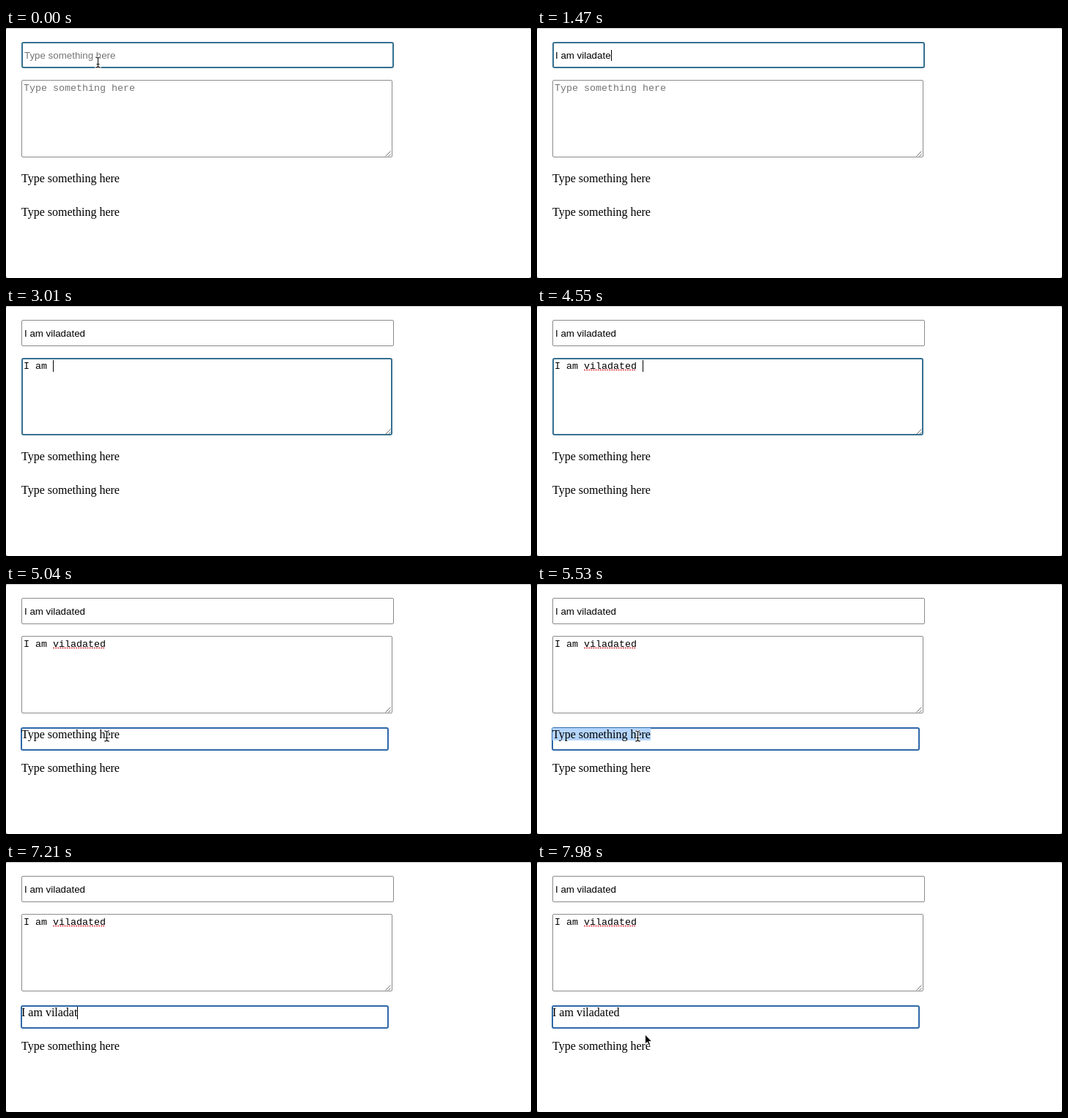
Animation of 716 by 342 pixels, one loop 8 s. Source, as an HTML page:

```html
<!DOCTYPE html>
<html lang="en">
<head>
<meta charset="utf-8">
<title>Typing into editable fields</title>
<style>
  html, body { margin: 0; width: 100%; height: 100%; overflow: hidden; background: #777; }
  #stage { position: relative; width: 716px; height: 342px; overflow: hidden; background: #fff; border-radius: 3px; }
  #stage::before { content: ""; position: absolute; inset: 0 0 auto; height: 1px; background: #ccc; }
  .field, .line, .caret, svg { position: absolute; }
  .field { box-sizing: border-box; --ring: #35708f; }
  .box { border: 1px solid #8a8a8a; border-radius: 2px; }
  .field.focus { border: 2px solid var(--ring); border-radius: 3px; }
  .line { white-space: pre; color: #000; }
  .line.hint { color: #757575; }
  .line.selected span { background: #b4d5fe; }
  .caret { width: 1px; background: #000; visibility: hidden; }
  .sans { font: 13.333px/15px "Liberation Sans", Arial, sans-serif; }
  .mono { font: 13.333px/15px "Liberation Mono", "Courier New", monospace; }
  .serif { font: 16px/18px "Liberation Serif", "Times New Roman", serif; }
  #input { left: 21px; top: 19px; width: 508px; height: 36px; }
  #area { left: 21px; top: 71px; width: 506px; height: 106px; }
  #edit { left: 20px; top: 196px; width: 502px; height: 32px; --ring: #2f68a8; }
  #spell { left: 64px; top: 86px; }
  #grip { left: 516px; top: 167px; }
  #mouse { left: 0; top: 0; overflow: visible; }
</style>
</head>
<body>
<div id="stage">
  <div class="field box" id="input"></div>
  <div class="field box" id="area"></div>
  <div class="field" id="edit"></div>

  <div class="line sans" style="left:25px;top:30px"><span></span></div>
  <div class="line mono" style="left:24px;top:75px"><span></span></div>
  <div class="line serif" style="left:21px;top:197px"><span></span></div>
  <div class="line serif" style="left:21px;top:243px"><span>Type something here</span></div>
  <div class="caret" id="caret"></div>

  <svg id="spell" width="72" height="3">
    <path d="M1 1.5H72" stroke="#e0434b" stroke-width="2" stroke-linecap="round" stroke-dasharray="0.1 3"/>
  </svg>
  <svg id="grip" width="10" height="10">
    <path d="M1.5 8.5L8.5 1.5M5.5 8.5L8.5 5.5" stroke="#707070" fill="none"/>
  </svg>
  <svg id="mouse" width="1" height="1">
    <g id="beam" fill="none" stroke-linecap="round">
      <path id="bar" d="M-3 -7Q0 -7 0 -5Q0 -7 3 -7M0 -5V5M-3 7Q0 7 0 5Q0 7 3 7M-1.5 2.5H1.5" stroke="#fff" stroke-width="2.6"/>
      <path d="M-3 -7Q0 -7 0 -5Q0 -7 3 -7M0 -5V5M-3 7Q0 7 0 5Q0 7 3 7M-1.5 2.5H1.5" stroke="#111" stroke-width="1.1"/>
    </g>
    <path id="arrow" d="M0 0V13L3 10.3L5 15L7.2 14L5.2 9.5H9.2Z" fill="#000" stroke="#fff" stroke-width="0.9"/>
  </svg>
</div>
<script>
const LOOP = 8000, STEP = 70;
const HINT = "Type something here", TEXT = "I am viladated ";
const $ = id => document.getElementById(id);
const lines = document.querySelectorAll(".line");

// Focus time, key press times and caret geometry of each field
const fields = [
  { box: $("input"), focus: -600, caretTop: 30, caretHeight: 15,
    keys: [70, 210, 420, 490, 560, 700, 770, 910, 1050, 1120, 1260, 1400, 1470, 1610] },
  { box: $("area"), focus: 2310, caretTop: 74, caretHeight: 16,
    keys: [2590, 2660, 2730, 2870, 2940, 3080, 3220, 3430, 3570, 3640, 3780, 3920, 3990, 4130, 4270] },
  { box: $("edit"), focus: 4970, caretTop: 198, caretHeight: 17, selectAt: 5180,
    keys: [5880, 6020, 6160, 6230, 6300, 6440, 6580, 6790, 6860, 7000, 7070, 7210, 7280, 7420] }
];
fields.forEach((f, i) => { f.line = lines[i]; f.span = lines[i].firstElementChild; });

// Pointer trips: shown from, hidden at, moving between, start and end points
const trips = [
  { show: 0, hide: 70, move: [0, 1], from: [125, 47], to: [125, 47] },
  { show: 1750, hide: 2590, move: [1820, 2240], from: [125, 47], to: [115, 88] },
  { show: 4620, hide: 5950, move: [4620, 4970], from: [115, 88], to: [137, 208] },
  { show: 7560, hide: LOOP, move: [7560, 7910], from: [137, 208], to: [147, 236] }
];

const ease = p => p * p * (3 - 2 * p);
const clamp = p => Math.min(1, Math.max(0, p));
const show = (el, on) => { el.style.visibility = on ? "visible" : "hidden"; };

function drawField(f, t, active) {
  const typed = f.keys.filter(k => k <= t);
  const hint = !typed.length;
  f.box.classList.toggle("focus", active);
  f.span.textContent = hint ? HINT : TEXT.slice(0, typed.length);
  f.line.classList.toggle("hint", hint && !f.selectAt);
  f.line.classList.toggle("selected", hint && t >= f.selectAt);
  if (!active) return;

  const last = hint ? f.focus : typed[typed.length - 1];
  const caret = $("caret");
  const x = f.line.offsetLeft + (hint ? 0 : f.span.getBoundingClientRect().width);
  caret.style.left = Math.round(x) + "px";
  caret.style.top = f.caretTop + "px";
  caret.style.height = f.caretHeight + "px";
  show(caret, (t - last) % 1000 < 500 && !(hint && f.selectAt));
}

function overField(x, y) {
  const spans = [[19, 55], [71, 177], [197, 227], [243, 273]];
  return x > 21 && x < 521 && spans.some(([a, b]) => y >= a && y <= b);
}

function drawMouse(t) {
  const trip = trips.find(m => t >= m.show && t < m.hide);
  show($("beam"), false);
  show($("arrow"), false);
  if (!trip) return;
  const [a, b] = trip.move;
  const p = ease(clamp((t - a) / (b - a)));
  const [x, y] = trip.from.map((v, i) => Math.round(v + (trip.to[i] - v) * p));
  $("mouse").style.transform = `translate(${x + 0.5}px, ${y}px)`;
  show($(overField(x, y) ? "beam" : "arrow"), true);
}

function draw(time) {
  const t = Math.floor(time % LOOP / STEP) * STEP;
  const current = fields.filter(f => f.focus <= t).pop();
  fields.forEach(f => drawField(f, t, f === current));
  show($("spell"), t >= 4270);
  drawMouse(t);
}

const start = performance.now();
function tick() {
  draw(performance.now() - start);
  requestAnimationFrame(tick);
}
tick();
</script>
</body>
</html>
```
